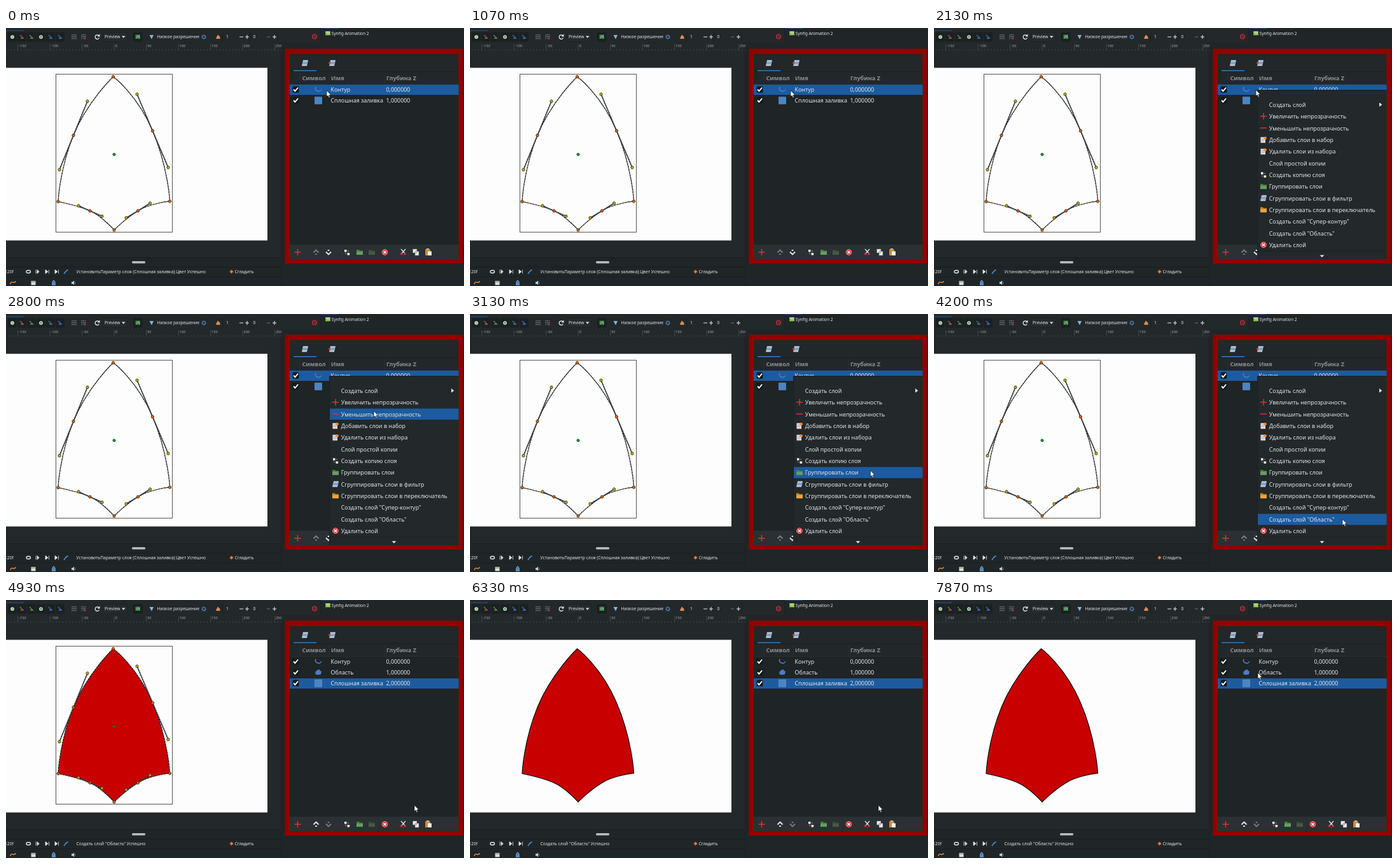
An HTML page that plays this animation: 720x405 px, repeating every 8 s.

```html
<!DOCTYPE html>
<html lang="ru">
<head>
<meta charset="utf-8">
<title>Layers panel</title>
<style>
html, body { margin: 0; width: 100%; height: 100%; overflow: hidden; background: #202527; }
svg { display: block; width: 720px; height: 405px; font: 8.9px "Noto Sans", "Open Sans", sans-serif; fill: #e4e6e7; }
.small { font-size: 6.7px; }
.ruler { font-size: 5.6px; fill: #a4a8aa; }
.head { font-size: 9.1px; font-weight: 700; fill: #8b9092; }
.line { fill: none; stroke: #e6e8e9; stroke-width: 1.3; }
.dim { opacity: .42; }
</style>
</head>
<body>
<svg viewBox="0 0 720 405" xmlns="http://www.w3.org/2000/svg">
  <defs>
    <path id="ship" d="M168.5 76.5C168.5 76.5 128 115 106 168.5C84 222.5 82 272.5 82 272.5C82 272.5 114 279 132 287C151 295.5 170 317 170 317C170 317 189 298 207.5 287C226.5 275 257.5 272 257.5 272C257.5 272 255 219 230.5 161.5C206 104 168.5 76.5 168.5 76.5Z"/>
    <g id="stack">
      <path d="M-3-4.5H5L3 4.5H-5Z" fill="#c3d3e2"/>
      <path d="M-3.7-1.5H4.300L3.600 1.500H-4.300Z" fill="#8fb2d3"/>
      <path d="M-4-1.600H4M-4.500 1.400H3.600" stroke="#4a7198" stroke-width=".7"/>
    </g>
    <g id="check">
      <rect x="-5" y="-5" width="10" height="10" rx="1.5" fill="#14191c"/>
      <path d="M-3.4 0L-1 2.6L3.6-3" fill="none" stroke="#fff" stroke-width="1.9"/>
    </g>
    <path id="plus" d="M-5 0H5M0-5V5" stroke="#d8343a" stroke-width="1.5"/>
    <path id="minus" d="M-5 0H5" stroke="#d8343a" stroke-width="1.5"/>
    <g id="folder"><path d="M-5-4H-1L0-2.6H5V4H-5Z" fill="#478045"/><path d="M-5-1H5V4H-5Z" fill="#659f5c"/></g>
    <g id="switch"><path d="M-5-4H-1L0-2.6H5V4H-5Z" fill="#c9821d"/><path d="M-5-1H5V4H-5Z" fill="#e8a838"/></g>
    <g id="set"><path d="M-4.5-4H3V5H-4.5Z" fill="#e2ddd6"/><path d="M-3-1H2M-3 1.5H2" stroke="#9a9a94" stroke-width=".8"/><circle cx="2.6" cy="-2.4" r="2.3" fill="#e39045"/></g>
    <g id="copy"><path d="M-4-4H-.5V-.5H-4Z" fill="#f1f1e8"/><path d="M.5 1H4.2V4.5H.5Z" fill="#f0ecd0"/><path d="M1-2H3M-3 2H-1" stroke="#a0a37c"/></g>
    <g id="del"><circle r="4.9" fill="#d5282e"/><circle r="4.2" fill="none" stroke="#f5b4b4" stroke-width=".7"/><path d="M-2-2L2 2M2-2L-2 2" stroke="#fff" stroke-width="1.5"/></g>
    <g id="up"><path class="line" style="stroke-width:1.9" d="M-4 .5L0-3.5L4 .5"/><path d="M-1.3 2H1.3V4H-1.3Z"/></g>
    <path id="outline" d="M-4-4C-7 2 2 5 5 0" fill="none" stroke="#4a7dbb" stroke-width="1.6"/>
    <path id="region" d="M-4-2L1-5L5-1L4 3L-2 4L-5 2Z" fill="#4980c2"/>
    <path id="solid" d="M-5.5-5.5H5.5V5.5H-5.5Z" fill="#4b84c7" stroke="#6d9dd5" stroke-width=".6"/>
  </defs>

  <!-- window -->
  <rect width="720" height="405" fill="#202527"/>
  <rect width="494" height="23" fill="#23282a"/>
  <rect y="23" width="432" height="337" fill="#23282b"/>
  <rect y="360" width="432" height="45" fill="#202527"/>
  <path d="M0 360.5H432M0 375.5H432M0 390.5H432" stroke="#181d1f"/>
  <path d="M432.5 23V405M494.5 0V23" stroke="#1b2022"/>
  <path d="M0 4H28M495 .3H523" stroke="#235a94"/>
  <rect y="62.5" width="411" height="271" fill="#fdfdfd"/>
  <rect x="198" y="366" width="21" height="3.6" rx="1.5" fill="#b9bdbf"/>
  <g id="ruler"></g>

  <!-- top toolbar -->
  <g id="tools"></g>
  <g stroke="#6b7174" stroke-width=".7"><path d="M103 10.500H111M103 13.500H111M103 16.500H111M104 10V18M107 10V18M110 10V18"/><path d="M118 10.500H125M118 13.500H125M119 10V18M122 10V18M125 10V18"/></g>
  <circle cx="123.500" cy="16" r="1.600" fill="#a83440"/>
  <path class="line" d="M146 12A3.300 3.300 0 1 0 146.500 15.500"/><path d="M147.500 9.500V13.500H143.500Z"/>
  <rect x="152" y="7" width="39" height="14" rx="2" fill="#262b2e" stroke="#1d2224"/>
  <path d="M182 12.500H187.500L184.700 15.800Z"/>
  <rect x="199.500" y="6.500" width="15" height="15" rx="2" fill="#192022"/>
  <path d="M203.500 10.500H211V17H203.500Z" fill="#438450"/><path d="M205 15L208 12L210 15" fill="none" stroke="#a5c4aa"/>
  <path d="M225.500 11H232L229 17.500Z" fill="#89b4e0"/>
  <circle cx="311" cy="14" r="2.600" fill="none" stroke="#5d96d0" stroke-width="1.800" stroke-dasharray="1.500 .7"/>
  <path d="M330 16L333 10.500L336.500 14V17H331Z" fill="#d98b58"/>
  <path d="M340.500 6V21M383.500 6V21M427.500 6V21" stroke="#1a1f21"/>
  <path d="M367 14H373M376 14H382M379 11V17M419 14H425M422 11V17" stroke="#e4e6e7" stroke-width="1.100"/>
  <path d="M410 14H415" stroke="#6f7577"/>
  <circle cx="485" cy="13.500" r="3.500" fill="#66262a" stroke="#c23238" stroke-width="1.200"/>
  <path d="M502 5H510V11.500H502Z" fill="#7cae4c"/><path d="M503 6.500H509M504 9H509" stroke="#edf3d8"/>
  <g class="small">
    <text x="155" y="16.300">Preview</text><text x="237.500" y="16.300">Низкое разрешение</text>
    <text x="346" y="16.300">1</text><text x="388.500" y="16.300">0</text><text x="511.500" y="11">Synfig Animation 2</text>
  </g>

  <!-- status and bottom bar -->
  <g class="small"><text x="-2" y="385">120f</text><text id="status" x="110.500" y="385"></text><text x="359.500" y="385">Сгладить</text></g>
  <rect x="32" y="380.500" width="6.500" height="4" rx="2" class="line"/>
  <path d="M47 379.500V385.500M49 379.500V385.500L52 382.500ZM62 379.500V385.500L66 382.500ZM67.500 379.500V385.500M77 379.500V385.500L81 382.500ZM82.500 379.500V385.500" stroke="#e4e6e7" stroke-width=".8"/>
  <path d="M91 386L94 382L97.500 379.500" fill="none" stroke="#4f91d4" stroke-width="1.600"/>
  <path d="M351.500 382.500L354.500 379.500L357.500 382.500L354.500 385.500Z" fill="#e07a2c"/>
  <path d="M6.500 402C9 395 12 403 15.500 397.500" fill="none" stroke="#e58a39" stroke-width="1.400"/>
  <path d="M39.500 397H46.500V403.500H39.500Z" fill="#d9dcd9"/><path d="M40 398.500H46" stroke="#678c55"/>
  <path d="M72 398.500H78V404H72Z" fill="#4d8bcd"/><path d="M73.500 398.500A1.500 2 0 0 1 76.500 398.500" fill="none" stroke="#b7cfe6"/>
  <path d="M103 398.500H105L107 396.500V403.500L105 401.500H103Z" fill="#cfd4d7"/><path d="M108.500 398V402" stroke="#568dcb"/>

  <!-- drawing -->
  <use id="fill" href="#ship" fill="#c80000"/>
  <use href="#ship" fill="none" stroke="#080808" stroke-width="1.200"/>
  <g id="handles">
    <use href="#ship" fill="none" stroke="#e8e8e8" stroke-width=".6" stroke-dasharray="1.500 3"/>
    <rect x="78.500" y="72.500" width="183" height="248" fill="none" stroke="#444" stroke-width=".9"/>
    <g id="tangents" fill="none"></g>
    <circle id="origin" cx="170" cy="198.500" r="2.100" fill="#168a35" stroke="#123d1c" stroke-width=".7"/>
    <g id="dots" stroke="#35280c" stroke-width=".8"></g>
  </g>

  <!-- layers panel -->
  <path d="M438.500 32.500H718.500V369.800H438.500Z" fill="#940000"/>
  <path d="M446 41H711.500V363H446Z" fill="#222729"/>
  <path d="M446 68.500H711.500" stroke="#1b2022"/>
  <rect x="452" y="66" width="36" height="2" fill="#2468b2"/>
  <use href="#stack" x="470" y="55"/>
  <use href="#stack" x="513" y="55"/><path d="M506.500 55L510 52V58Z" fill="#df3a32"/>
  <rect x="446" y="89" width="265.500" height="251" fill="#1f2426"/>
  <path d="M446 88.500H711.500M462.500 71V87M508.500 71V87M595.500 71V87" stroke="#2a3033"/>
  <g class="head"><text x="465.500" y="81.500">Символ</text><text x="511" y="81.500">Имя</text><text x="598" y="81.500">Глубина Z</text></g>
  <g id="before"></g>
  <g id="after"></g>
  <rect x="446" y="340" width="265.500" height="23" fill="#2a3033"/>
  <use href="#plus" x="458.500" y="352"/>
  <use id="raise" href="#up" x="487.500" y="352"/>
  <g id="lower"><use href="#up" transform="translate(507 352) scale(1 -1)"/></g>
  <use href="#copy" x="536" y="352"/>
  <use href="#folder" x="556" y="352"/>
  <use href="#folder" x="575" y="352" opacity=".4"/>
  <use href="#del" x="595.500" y="352"/>
  <path d="M621 347L627 354M628 347L622 354" stroke="#e2e4e5" stroke-width="1.300"/>
  <path d="M619.500 355L622 353L623 356ZM629 355L627 353L625.500 356Z" fill="#d8343a" stroke="#d8343a"/>
  <path d="M639.500 347H646V353H639.500ZM643 350.500H649V357H643Z" fill="#eef0f0" stroke="#666" stroke-width=".6"/>
  <path d="M659 347.500H667V357H659Z" fill="#c98b3d"/><path d="M663 350.500H669V357H663Z" fill="#f3f3ee"/><path d="M661 347H665" stroke="#ddd" stroke-width="1.600"/>

  <g id="menu">
    <rect x="508.500" y="97" width="203" height="266" fill="#23282b"/>
    <path d="M508.500 363V97.500H711.500" fill="none" stroke="#1a1f21"/>
    <rect id="hover" x="509" width="202.500" height="17.400" fill="#1c5b9f"/>
    <g id="items"></g>
    <path d="M700 117L704.500 120.300L700 123.600Z"/>
    <path d="M509 350H711.500" stroke="#1b2022"/>
    <path d="M606.500 356.500H613.500L610 360Z"/>
  </g>
  <path id="cursor" d="M0 0V9.800L2.200 7.900L3.700 11.400L5.300 10.700L3.900 7.300H6.900Z" fill="#fff" stroke="#111" stroke-width=".7"/>
</svg>

<script>
const $ = id => document.getElementById(id);
const fill = (id, html) => { $(id).innerHTML = html; };
const show = (id, on) => { $(id).style.display = on ? '' : 'none'; };
const use = (id, x, y) => `<use href="#${id}" x="${x}" y="${y}"/>`;
const label = (x, y, s) => `<text x="${x}" y="${y}">${s}</text>`;

// Ruler
let marks = '';
for (let i = 0; i < 86; i++) {
  const x = 3.5 + i * 5.05;
  marks += `M${x} 35.500V${i % 10 === 3 ? 25 : 33.5}`;
}
const numbers = [-150, -100, -50, 0, 50, 100, 150, 200, 250]
  .map((n, i) => label(20.3 + i * 50.45, 30, n)).join('');
fill('ruler', `<path d="${marks}" stroke="#5d6467" stroke-width=".6"/><g class="ruler">${numbers}</g>`);

// Toggle buttons of the toolbar
const tints = ['#83bc68', '#a85a48', '#688d4c', '#5f9560', '#4574a5', '#4372b3'];
fill('tools', tints.map((c, i) => {
  const x = 10 + i * 15;
  const mark = i % 3 ? `<path d="M${x - 3} 11L${x + 2} 16M${x - 2} 16H${x + 3}" stroke="${c}" stroke-width="1.300"/>`
    : `<circle cx="${x}" cy="14" r="2.3" fill="${c}" stroke="#e4e8df" stroke-width="1.1"/>`;
  return `<rect x="${x - 7}" y="6.500" width="14" height="15" rx="2" fill="#1b2123"/>${mark}`;
}).join(''));

// Spline handles: vertex, then its two tangent ends
const joints = [
  [106, 168.5, 128, 115, 84, 222.5],
  [230.5, 161.5, 206, 104, 255, 219],
  [132, 287, 114, 279, 151, 295.5],
  [207.5, 287, 189, 298, 226.5, 275]
];
const tips = [[168.5, 76.5], [82, 272.5], [170, 317], [257.5, 272]];
const dot = (x, y, c) => `<circle cx="${x}" cy="${y}" r="2.200" fill="${c}"/>`;
fill('tangents', joints.map(([x, y, a, b, c, d]) => {
  const path = `M${a} ${b}L${x} ${y}L${c} ${d}`;
  return `<path d="${path}" stroke="#20242a" stroke-width="1.700"/>
    <path d="${path}" stroke="#8a94a2" stroke-width=".7" stroke-dasharray="2 2"/>`;
}).join(''));
fill('dots', joints.map(([x, y, a, b, c, d]) =>
  dot(x, y, '#d2641b') + dot(a, b, '#b7ad18') + dot(c, d, '#b7ad18')).join('') +
  tips.map(([x, y]) => dot(x, y, '#d2641b')).join(''));

// Layer list
const layers = (rows, selected) => rows.map(([icon, name], i) => {
  const y = 97 + i * 17;
  const bar = i === selected ? `<rect x="446" y="${y - 8}" width="265.500" height="16" fill="#1c5b9f"/>` : '';
  return bar + use('check', 455.5, y - .5) + use(icon, 491, y - .3) +
    label(510.5, y + 3.4, name) + label(597.5, y + 3.4, i + ',000000');
}).join('');
const outline = ['outline', 'Контур'], region = ['region', 'Область'], solid = ['solid', 'Сплошная заливка'];
fill('before', layers([outline, solid], 0));
fill('after', layers([outline, region, solid], 2));

// Context menu
const STEP = 18.35, FIRST = 120.5;
const items = [
  ['', 'Создать слой'], ['plus', 'Увеличить непрозрачность'], ['minus', 'Уменьшить непрозрачность'],
  ['set', 'Добавить слои в набор'], ['set', 'Удалить слои из набора'], ['', 'Слой простой копии'],
  ['copy', 'Создать копию слоя'], ['folder', 'Группировать слои'], ['stack', 'Сгруппировать слои в фильтр'],
  ['switch', 'Сгруппировать слои в переключатель'], ['', 'Создать слой "Супер-контур"'],
  ['', 'Создать слой "Область"'], ['del', 'Удалить слой']
];
fill('items', items.map(([icon, name], i) => {
  const y = FIRST + i * STEP;
  return (icon && use(icon, 518, y - .3)) + label(526.7, y + 3.4, name);
}).join(''));

// Pointer path: time, x, y
const path = [
  [0, 504, 98], [1800, 504, 98], [1870, 506, 97], [2180, 506, 97], [2800, 578, 152],
  [3330, 645, 291], [3850, 642, 322], [6380, 642, 322], [7870, 509, 114], [8000, 509, 114]
];
const rate = (i, k) => (path[i + 1][k] - path[i][k]) / (path[i + 1][0] - path[i][0]);
const slope = (i, k) => {
  if (i === 0 || i === path.length - 1) return 0;
  const a = rate(i - 1, k), b = rate(i, k);
  return a * b > 0 ? 2 * a * b / (a + b) : 0;
};
function pointer(t, k) {
  const i = path.findIndex((p, n) => t < path[n + 1][0]);
  const span = path[i + 1][0] - path[i][0], u = (t - path[i][0]) / span, v = 1 - u;
  return path[i][k] * v * v * (1 + 2 * u) + path[i + 1][k] * u * u * (3 - 2 * u) +
    span * u * v * (slope(i, k) * v - slope(i + 1, k) * u);
}

const OPEN = 2130, CLOSE = 4800, CREATED = 4865, CLEAN = 6330;
function draw(now) {
  const t = now % 8000, x = pointer(t, 1), y = pointer(t, 2);
  const made = t >= CREATED, row = Math.round((y - FIRST) / STEP);
  $('cursor').setAttribute('transform', `translate(${x} ${y})`);
  show('menu', t >= OPEN && t < CLOSE);
  show('hover', x > 509 && row >= 0);
  $('hover').setAttribute('y', FIRST + row * STEP - 8.7);
  show('before', !made);
  show('after', made);
  show('fill', made);
  show('handles', t < CLEAN);
  $('raise').setAttribute('class', made ? '' : 'dim');
  $('lower').setAttribute('class', made ? 'dim' : '');
  $('status').textContent = made ? 'Создать слой "Область" Успешно'
    : 'УстановитьПараметр слоя (Сплошная заливка):Цвет Успешно';
  requestAnimationFrame(() => draw(performance.now()));
}
draw(performance.now());
</script>
</body>
</html>
```
